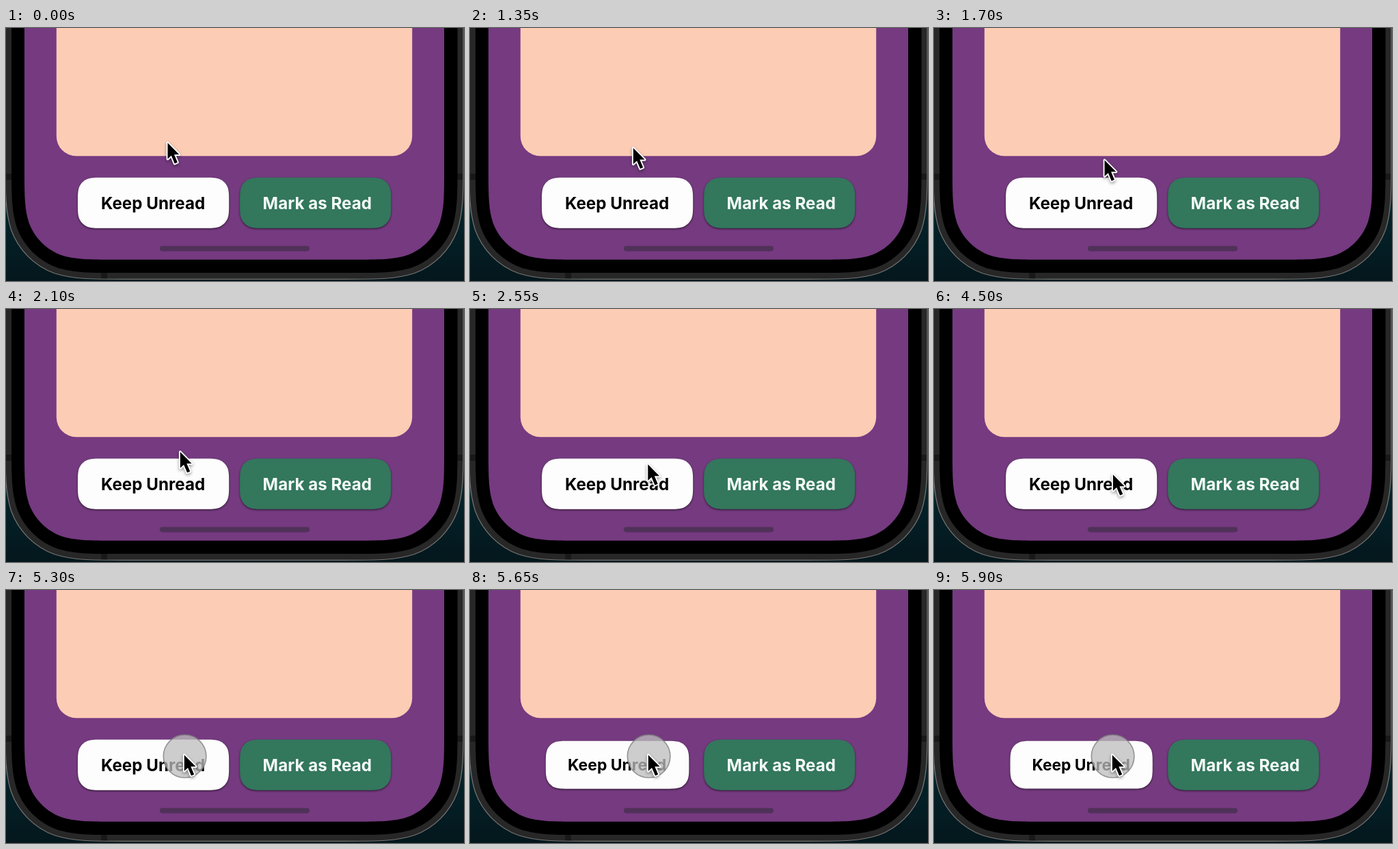
Recreate the animation shown at these times as an HTML page with a canvas. Size 670 by 370 pixels, loop 8 s.

```html
<!DOCTYPE html>
<html lang="en">
<head>
<meta charset="utf-8">
<title>Read buttons</title>
<style>
  html, body { margin: 0; width: 100%; height: 100%; overflow: hidden; background: #04171d; }
  canvas { display: block; width: 670px; height: 370px; }
</style>
</head>
<body>
<canvas id="stage"></canvas>
<script>
const W = 670, H = 370, LOOP = 8000;
const canvas = document.getElementById('stage');
const ctx = canvas.getContext('2d');
const dpr = window.devicePixelRatio || 1;
canvas.width = W * dpr;
canvas.height = H * dpr;

// Pointer tip over time: [ms, x, y]
const PATH = [
  [0, 236.5, 168], [50, 236.5, 168], [250, 236.5, 170], [1300, 236.5, 170],
  [1350, 238.8, 175.5], [1700, 249.5, 193.3], [2150, 255.5, 211], [2550, 260.3, 227.3],
  [3000, 262.5, 240], [3150, 262.8, 242], [3250, 263, 243.3], [4450, 263, 243.3],
  [4550, 260.8, 241.3], [LOOP, 260.8, 241.3]
];
const ARROW = [[0, 0], [0, 23.5], [5.3, 18.6], [10.2, 30.3], [14.4, 28.5], [9.5, 17], [16.8, 17]];
const TOUCH_AT = 5300, PRESS_AT = 5350, PRESS_SCALE = 0.941;

// Rounded rectangle with continuous-curvature corners
function smoothRect(x, y, w, h, r) {
  const p = new Path2D();
  const a = 1.52866 * r, b = 1.08849 * r, c = 0.86841 * r;
  const d = 0.63149 * r, e = 0.07491 * r, f = 0.37282 * r, g = 0.16906 * r;
  // u runs along the incoming side, v along the outgoing one
  function corner(cx, cy, ux, uy, vx, vy) {
    const at = (u, v) => [cx + ux * u + vx * v, cy + uy * u + vy * v];
    p.lineTo(...at(a, 0));
    p.bezierCurveTo(...at(b, 0), ...at(c, 0), ...at(d, e));
    p.bezierCurveTo(...at(f, g), ...at(g, f), ...at(e, d));
    p.bezierCurveTo(...at(0, c), ...at(0, b), ...at(0, a));
  }
  p.moveTo(x + a, y);
  corner(x + w, y, -1, 0, 0, 1);
  corner(x + w, y + h, 0, -1, -1, 0);
  corner(x, y + h, 1, 0, 0, -1);
  corner(x, y, 0, 1, 1, 0);
  p.closePath();
  return p;
}

function roundRect(x, y, w, h, r) {
  const p = new Path2D();
  p.roundRect(x, y, w, h, r);
  return p;
}

const rim = smoothRect(-1, -500, 670, 867.3, 114);
const bezel = smoothRect(8, -500, 652.5, 858, 105);
const screen = smoothRect(27, -500, 614, 838.8, 86);
const card = roundRect(73.8, -300, 520.4, 487.3, 29);
const homeBar = roundRect(225, 318.8, 219, 7.6, 3.8);
const buttonShape = smoothRect(-110.6, -37, 221.2, 74, 23.5);

function fill(path, color) {
  ctx.fillStyle = color;
  ctx.fill(path);
}

function shadow(color, blur, y) {
  ctx.shadowColor = color;
  ctx.shadowBlur = blur * dpr;
  ctx.shadowOffsetY = y * dpr;
}

function drawPhone() {
  const bg = ctx.createLinearGradient(0, 250, 0, H);
  bg.addColorStop(0, '#03252c');
  bg.addColorStop(1, '#04171d');
  ctx.fillStyle = bg;
  ctx.fillRect(0, 0, W, H);

  fill(rim, '#272727');
  ctx.save();
  ctx.clip(rim);
  ctx.fillStyle = '#191919';
  ctx.fillRect(0, 213, W, 9);
  ctx.fillRect(139, 350, 9, 20);
  ctx.restore();
  ctx.strokeStyle = '#777573';
  ctx.lineWidth = 1.2;
  ctx.stroke(rim);

  fill(bezel, '#000');
  fill(screen, '#753a80');
  fill(card, '#fcccb5');
  fill(homeBar, '#503159');
}

function drawButton(x, label, labelX, color, ink, scale) {
  ctx.save();
  ctx.translate(x, 255.7);
  ctx.scale(scale, scale);
  ctx.save();
  shadow('rgba(0,0,0,.6)', 3, 1.2);
  fill(buttonShape, color);
  ctx.restore();
  ctx.fillStyle = ink;
  ctx.font = '700 24.2px Inter, "Open Sans", sans-serif';
  ctx.textAlign = 'center';
  ctx.fillText(label, labelX, 8.8);
  ctx.restore();
}

function drawTouch() {
  ctx.beginPath();
  ctx.arc(261.6, 243.2, 31.3, 0, Math.PI * 2);
  ctx.fillStyle = 'rgba(190,190,190,.75)';
  ctx.fill();
  ctx.strokeStyle = 'rgba(128,128,128,.8)';
  ctx.lineWidth = 1.6;
  ctx.stroke();
}

function drawPointer(x, y) {
  ctx.save();
  ctx.translate(x, y);
  ctx.beginPath();
  ARROW.forEach(([px, py]) => ctx.lineTo(px, py));
  ctx.closePath();
  ctx.save();
  shadow('rgba(0,0,0,.4)', 4, 2);
  ctx.strokeStyle = '#fff';
  ctx.lineWidth = 3.8;
  ctx.lineJoin = 'round';
  ctx.stroke();
  ctx.restore();
  ctx.fillStyle = '#000';
  ctx.fill();
  ctx.restore();
}

function pointerAt(t) {
  const i = PATH.findIndex(k => k[0] > t);
  const [t0, x0, y0] = PATH[i - 1], [t1, x1, y1] = PATH[i];
  const u = (t - t0) / (t1 - t0);
  return [x0 + (x1 - x0) * u, y0 + (y1 - y0) * u];
}

// Critically damped spring, 0 to 1
function spring(ms) {
  const s = Math.max(0, ms) / 1000 * 12.57;
  return 1 - (1 + s) * Math.exp(-s);
}

function draw(t) {
  ctx.setTransform(dpr, 0, 0, dpr, 0, 0);
  drawPhone();
  const scale = 1 - (1 - PRESS_SCALE) * spring(t - PRESS_AT);
  drawButton(215.6, 'Keep Unread', -0.5, '#fdfdfd', '#000', scale);
  drawButton(452.7, 'Mark as Read', 2.6, '#33775d', '#f4fbf8', 1);
  if (t >= TOUCH_AT) drawTouch();
  drawPointer(...pointerAt(t));
}

const start = performance.now();
function tick() {
  draw((performance.now() - start) % LOOP);
  requestAnimationFrame(tick);
}
tick();
</script>
</body>
</html>
```
